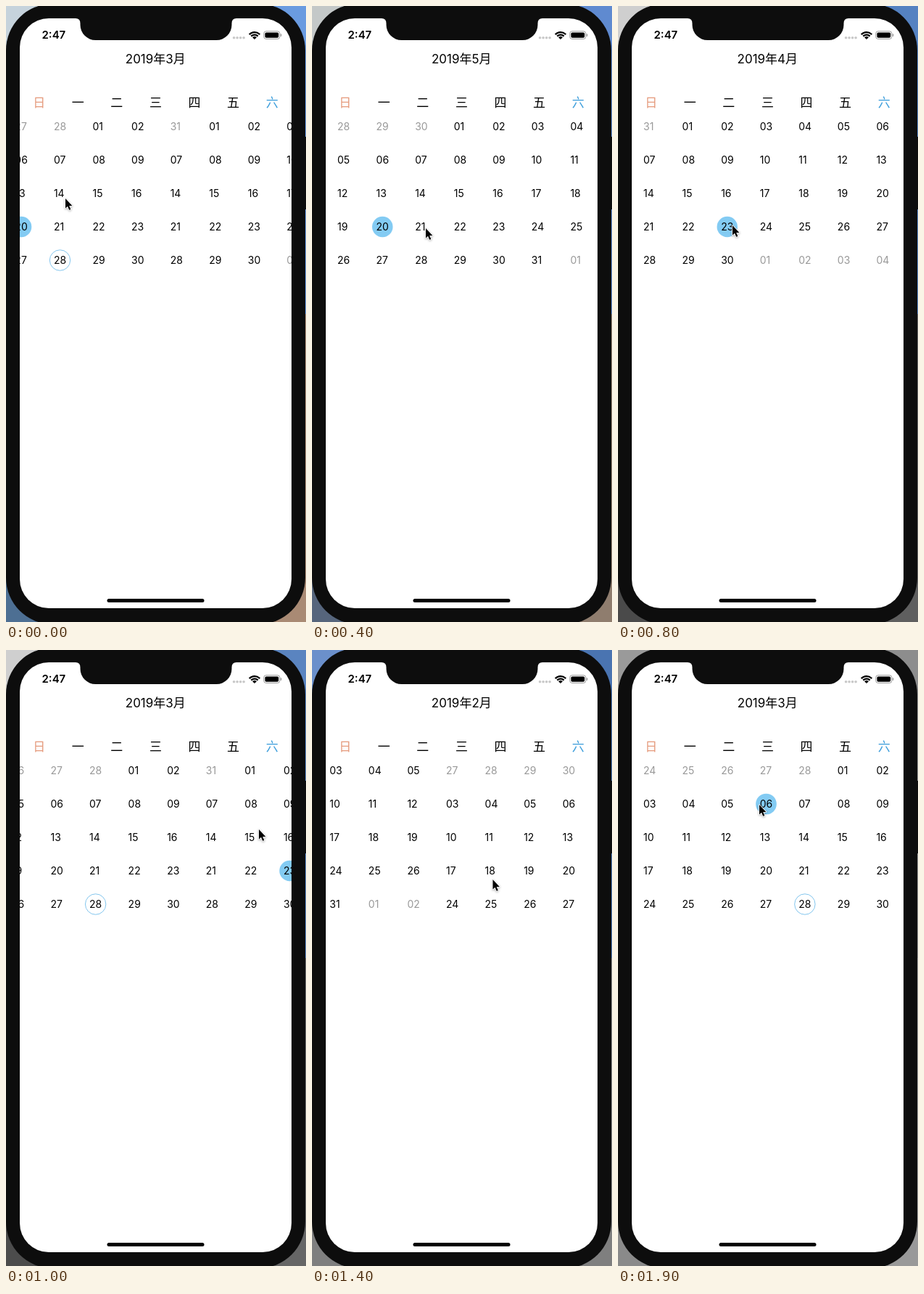
Animation, 414 px wide and 848 px high, one loop 2000 ms. Source, as an HTML page with a canvas:

```html
<!DOCTYPE html>
<html lang="zh-CN">
<head>
<meta charset="utf-8">
<title>Calendar</title>
<style>
html, body { margin: 0; width: 100%; height: 100%; overflow: hidden; background: #0d0d0d; }
canvas { display: block; width: 414px; height: 848px; }
</style>
</head>
<body>
<canvas id="stage"></canvas>
<script>
const WIDTH = 414, HEIGHT = 848, LOOP = 2000, STEP = 100;
const SCREEN = { x: 19, y: 17, w: 375, h: 812 };
const COLUMN = SCREEN.w / 7;
const FONT = 'Inter, "Noto Sans CJK SC", "Noto Sans CJK", sans-serif';
const CJK = '"Noto Sans CJK SC", "Noto Sans CJK", sans-serif';
const YEAR = 2019, TODAY = { month: 2, day: 28 };

const canvas = document.getElementById('stage');
const ctx = canvas.getContext('2d');
const dpr = window.devicePixelRatio || 1;
canvas.width = WIDTH * dpr;
canvas.height = HEIGHT * dpr;
ctx.scale(dpr, dpr);

// Scroll position in months, January = 0
const scrollTrack = [
  [0, 2.489], [100, 3], [200, 3.5], [300, 4], [400, 4], [500, 3.4], [600, 3],
  [900, 3], [1000, 2.358], [1100, 1], [1200, 0], [1300, 0], [1400, 0.6],
  [1500, 1.5], [1600, 2], [1900, 2], [2000, 2.489]
];
const cursorTrack = [
  [0, 82, 265], [200, 90, 280], [300, 98, 306], [400, 157, 306], [600, 263, 256],
  [800, 158, 302], [1000, 349, 247], [1200, 241, 283], [1600, 258, 349],
  [1900, 195, 213], [2000, 82, 265]
];
const selections = [
  [0, 2, 20], [300, 4, 20], [600, 3, 17], [800, 3, 23], [1600, 2, 28], [1900, 2, 6]
];
// Wallpaper corners: top left, top right, bottom left, bottom right
const wallpaper = [
  [0, '#c6d3dc', '#6a9be0', '#4d6f93', '#a98a74'],
  [400, '#c4c8c8', '#5f8ad0', '#56657c', '#8f7d6e'],
  [600, '#d0d0d0', '#5080c4', '#484848', '#585858'],
  [1000, '#cfcfcf', '#5a84c0', '#4c4c4c', '#666666'],
  [1200, '#6d8dc8', '#4a76bd', '#777777', '#777777'],
  [1600, '#6a94cf', '#4a73a5', '#888888', '#888888'],
  [1900, '#9a9a9a', '#8d8d8d', '#8a8a8a', '#999999'],
  [2000, '#c6d3dc', '#6a9be0', '#4d6f93', '#a98a74']
];

function segment(track, t) {
  const i = Math.max(1, track.findIndex(key => key[0] > t));
  const a = track[i - 1], b = track[i];
  return { a, b, k: (t - a[0]) / (b[0] - a[0]) };
}

function sample(track, t) {
  const { a, b, k } = segment(track, t);
  return a.slice(1).map((v, i) => v + (b[i + 1] - v) * k);
}

function roundRect(x, y, w, h, r) {
  ctx.beginPath();
  ctx.roundRect(x, y, w, h, r);
}

function circle(x, y, r) {
  ctx.beginPath();
  ctx.arc(x, y, r, 0, Math.PI * 2);
}

function text(str, x, y, font, color = '#000', align = 'left') {
  ctx.font = font;
  ctx.textAlign = align;
  ctx.fillStyle = color;
  ctx.fillText(str, x, y);
}

function drawWallpaper(t) {
  const { a, b, k } = segment(wallpaper, t);
  for (let i = 0; i < 4; i++) {
    const box = [i % 2 * WIDTH / 2, (i >> 1) * HEIGHT / 2, WIDTH / 2, HEIGHT / 2];
    ctx.fillStyle = a[i + 1];
    ctx.fillRect(...box);
    ctx.globalAlpha = k;
    ctx.fillStyle = b[i + 1];
    ctx.fillRect(...box);
    ctx.globalAlpha = 1;
  }
}

function drawPhone() {
  ctx.fillStyle = '#0d0d0d';
  roundRect(0, -3, 413, 854, 64);
  ctx.fill();
  ctx.fillRect(412, 180, 2, 100);
  ctx.fillStyle = '#fff';
  roundRect(SCREEN.x, SCREEN.y, SCREEN.w, SCREEN.h, 40);
  ctx.fill();
}

function drawNotch() {
  ctx.fillStyle = '#0d0d0d';
  ctx.beginPath();
  ctx.moveTo(96, 16);
  ctx.lineTo(96, 17);
  ctx.quadraticCurveTo(102.5, 17, 102.5, 24);
  ctx.arcTo(102.5, 47, 125, 47, 21);
  ctx.arcTo(311.5, 47, 311.5, 24, 21);
  ctx.lineTo(311.5, 24);
  ctx.quadraticCurveTo(311.5, 17, 318, 17);
  ctx.lineTo(318, 16);
  ctx.fill();
}

function drawStatusBar() {
  text('2:47', 49.5, 45.3, '600 15px ' + FONT);
  ctx.fillStyle = '#c8c8c8';
  for (let i = 0; i < 4; i++) {
    circle(314.6 + i * 4.5, 43.7, 1.8);
    ctx.fill();
  }

  ctx.strokeStyle = ctx.fillStyle = '#000';
  ctx.lineWidth = 2.3;
  for (const r of [9.9, 6.4]) {
    ctx.beginPath();
    ctx.arc(343, 46, r, -Math.PI * 0.76, -Math.PI * 0.24);
    ctx.stroke();
  }
  ctx.beginPath();
  ctx.moveTo(343, 46);
  ctx.arc(343, 46, 4, -Math.PI * 0.76, -Math.PI * 0.24);
  ctx.fill();

  ctx.strokeStyle = '#999';
  ctx.lineWidth = 1;
  roundRect(355.8, 34.8, 22, 10.6, 3);
  ctx.stroke();
  ctx.fillStyle = '#000';
  roundRect(357.4, 36.4, 18.8, 7.4, 1.8);
  ctx.fill();
  ctx.fillStyle = '#999';
  roundRect(378.8, 38.3, 1.4, 3.8, [0, 1, 1, 0]);
  ctx.fill();

  ctx.fillStyle = '#000';
  roundRect(139.5, 816, 134, 5, 2.5);
  ctx.fill();
}

function drawHeader(month) {
  text(`${YEAR}年${month + 1}月`, 206.3, 78.5, '17px ' + FONT, '#000', 'center');
  [...'日一二三四五六'].forEach((name, i) => {
    const color = i === 0 ? '#e59a7c' : i === 6 ? '#3f9fdc' : '#000';
    text(name, 45.7 + i * COLUMN, 138.8, '17px ' + CJK, color, 'center');
  });
}

function drawMonth(month, left, selected) {
  const offset = new Date(YEAR, month, 1).getDay();
  for (let i = 0; i < 35; i++) {
    const date = new Date(YEAR, month, 1 - offset + i);
    const day = date.getDate();
    const inMonth = date.getMonth() === month;
    const label = String(day).padStart(2, '0');
    const x = left + 16 + i % 7 * COLUMN;
    const y = 165.7 + Math.floor(i / 7) * 46;
    ctx.font = '14px ' + FONT;
    const half = ctx.measureText(label).width / 2;

    if (inMonth) {
      circle(x + half, y + 0.3, half + 5.6);
      if (month === selected.month && day === selected.day) {
        ctx.fillStyle = '#83cbf3';
        ctx.fill();
      } else if (month === TODAY.month && day === TODAY.day) {
        ctx.strokeStyle = '#83c6ee';
        ctx.lineWidth = 1;
        ctx.stroke();
      }
    }
    text(label, x, y + 5, ctx.font, inMonth ? '#000' : '#999');
  }
}

function drawCalendar(t) {
  const [position] = sample(scrollTrack, t);
  const [, month, day] = selections.filter(s => s[0] <= t).pop();
  drawHeader(Math.round(position));
  ctx.save();
  ctx.beginPath();
  ctx.rect(SCREEN.x, 145, SCREEN.w, 240);
  ctx.clip();
  for (let m = Math.floor(position); m <= Math.ceil(position); m++) {
    drawMonth(m, SCREEN.x + (m - position) * SCREEN.w, { month, day });
  }
  ctx.restore();
}

function drawCursor(t) {
  const [x, y] = sample(cursorTrack, t);
  const arrow = new Path2D('M0 0V13.5L3 10.7L5.2 15.8L7.4 14.9L5.2 9.9H9.4Z');
  ctx.save();
  ctx.translate(x, y);
  ctx.shadowColor = 'rgba(0,0,0,.35)';
  ctx.shadowBlur = 3 * dpr;
  ctx.shadowOffsetY = dpr;
  ctx.strokeStyle = '#fff';
  ctx.lineWidth = 1.6;
  ctx.lineJoin = 'round';
  ctx.stroke(arrow);
  ctx.shadowColor = 'transparent';
  ctx.fillStyle = '#000';
  ctx.fill(arrow);
  ctx.restore();
}

function draw(t) {
  drawWallpaper(t);
  drawPhone();
  drawNotch();
  drawStatusBar();
  drawCalendar(t);
  drawCursor(t);
}

const start = performance.now();
function tick() {
  const elapsed = (performance.now() - start) % LOOP;
  draw(Math.floor(elapsed / STEP) * STEP);
  requestAnimationFrame(tick);
}
tick();
</script>
</body>
</html>
```
